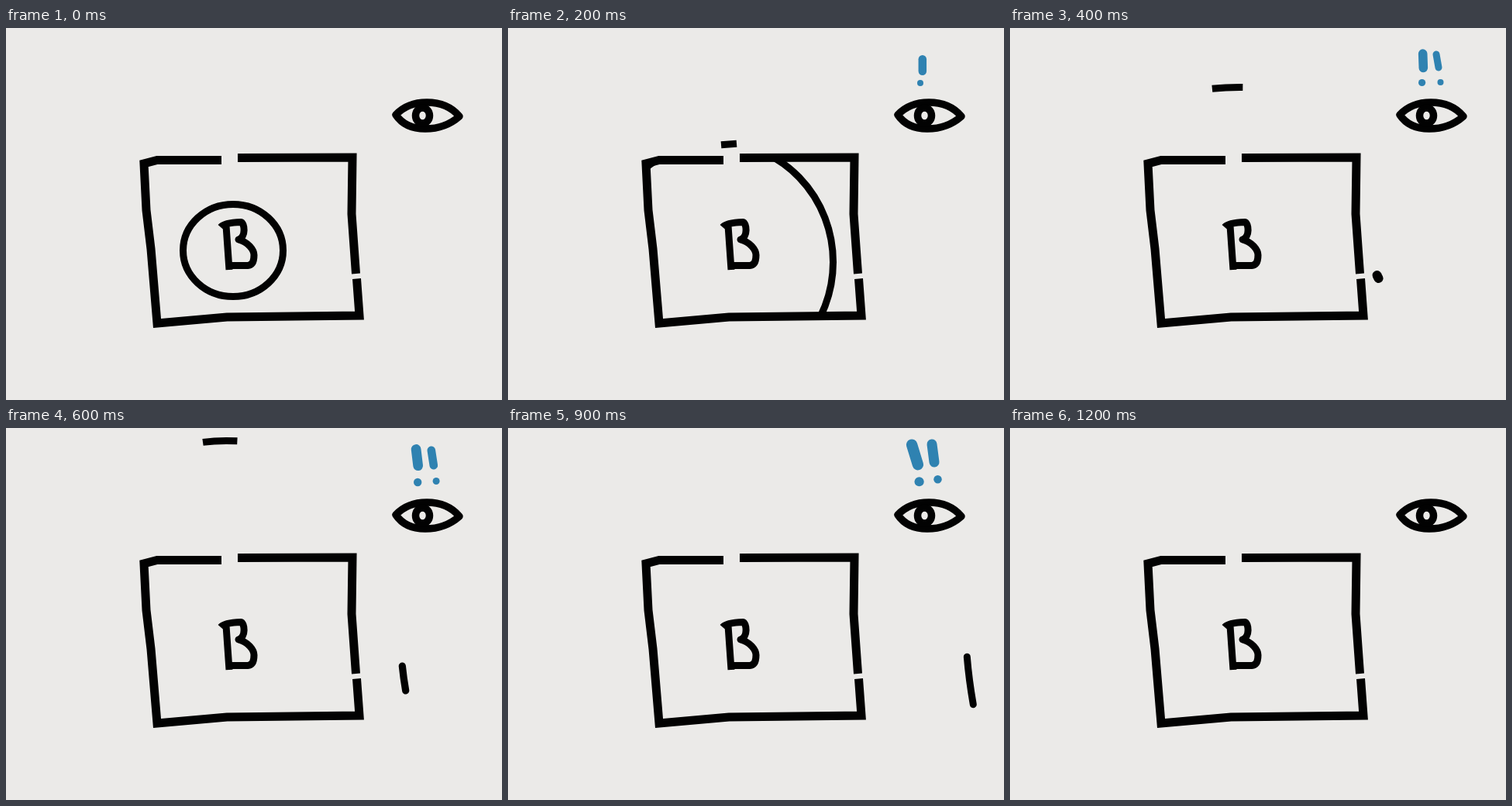
Write an HTML page with a canvas that moves like this. It is 640x480 px and loops after 2 s.

```html
<!DOCTYPE html>
<html lang="en">
<head>
<meta charset="utf-8">
<title>Wave in a box</title>
<style>
html, body { margin: 0; width: 100%; height: 100%; overflow: hidden; background: #ebeae8; }
canvas { display: block; }
</style>
</head>
<body>
<canvas id="stage" width="640" height="480"></canvas>
<script>
const ctx = document.getElementById('stage').getContext('2d');
const PAPER = '#ebeae8', INK = '#020202', BLUE = '#2f82b1';
const LAST = 12, STEP = 100, LOOP = 2000;

const walls = new Path2D(`M278 170.5 H195 L178 175 L181 235 L187 285 L195 381 L285 373 L456 371 L452.5 323.5
  M299 167.5 L447 167 L446 240 L451.5 317`);
const room = new Path2D('M178 174 L447 166 L446 240 L456 371 L285 373 L195 381 L187 285 Z');
const letter = new Path2D(`M277 257 Q282 251 303 250.5 C308 251 310 270 300 273
  C312 276 320 286 320 293 Q320 306 312 306.5 H289 M284 255 L288 312`);
const lids = new Path2D('M503 112 Q518 96 543 96 Q570 96 585 114 Q567 130 541 130 Q515 130 503 112 Z');

function stroke(path, width, color = INK, cap = 'butt', join = 'round') {
  ctx.strokeStyle = color;
  ctx.lineWidth = width;
  ctx.lineCap = cap;
  ctx.lineJoin = join;
  ctx.stroke(path);
}

function oval(x, y, rx, ry = rx) {
  const path = new Path2D();
  path.ellipse(x, y, rx, ry, 0, 0, 2 * Math.PI);
  return path;
}

// A line through its centre; dx, dy reach from there to one end.
function bar(x, y, dx, dy, bend = 0) {
  const path = new Path2D();
  path.moveTo(x - dx, y - dy);
  path.quadraticCurveTo(x - bend, y - bend, x + dx, y + dy);
  return path;
}

// The ring grows and drifts until it has left the room.
function wave(p) {
  if (p > 3) return;
  ctx.save();
  ctx.clip(room);
  stroke(oval(293 - 11.5 * p, 287 + 7.5 * p, 64.5 + 42.5 * p, 59.5 + 47.5 * p), 9);
  ctx.restore();
}

// Piece of the wave let out through the upper gap.
function upPulse(q) {
  if (q < 0) return;
  const y = 150 - 39.5 * q + 1.6 * q * q;
  stroke(bar(285 - 2.2 * q, y, 23 - 13 * 0.5 ** q, -0.8, q / 2), 9);
}

// Piece of the wave let out through the right gap.
function sidePulse(q) {
  if (q < 0) return;
  const u = q / 2;
  const x = 474.5 + 21.1 * u + 22.5 * u ** 2 - 4.58 * u ** 3;
  const half = 8 + 6.8 * q - 0.27 * q * q;
  const width = 9 + 3 * 0.3 ** q;
  stroke(bar(x, 321 + q, 1 + 0.6 * q, half - width / 2, q / 3), width, INK, 'round');
}

function mark(x, y, half, tilt, width, dotX, dotY, radius) {
  stroke(bar(x, y, tilt, half - width / 2), width, BLUE, 'round');
  ctx.fillStyle = BLUE;
  ctx.fill(oval(dotX, dotY, radius));
}

// One mark for each piece the eye has seen.
function marks(p) {
  const a = p - 2, b = p - 4;
  if (a >= 0) {
    mark(534.8 - 0.7 * a - 0.1 * a * a, 48 - 3.2 * a + 0.18 * a * a, 13 + a,
      0.08 * a * a, 10.5 + 0.55 * a, 532 - 0.2 * a, 71 - 0.25 * a, 4 + 0.3 * a);
  }
  if (b >= 0) {
    mark(551.5 - 0.6 * b, 42.5 - 2 * b, 13 + b, 1.5, 9 + 0.8 * b,
      555.5 - 0.2 * b, 70 - 0.75 * b, 4 + 0.25 * b);
  }
}

function draw(p) {
  ctx.fillStyle = PAPER;
  ctx.fillRect(0, 0, 640, 480);
  wave(p);
  stroke(walls, 11, INK, 'butt', 'miter');
  stroke(letter, 9);
  stroke(lids, 9.5);
  stroke(oval(537.5, 113, 9, 10), 9.5);
  if (p === LAST) return;
  upPulse(p - 2);
  sidePulse(p - 4);
  marks(p);
}

const start = performance.now();
function tick() {
  const t = (performance.now() - start) % LOOP;
  draw(Math.min(Math.floor(t / STEP), LAST));
  requestAnimationFrame(tick);
}
tick();
</script>
</body>
</html>
```
